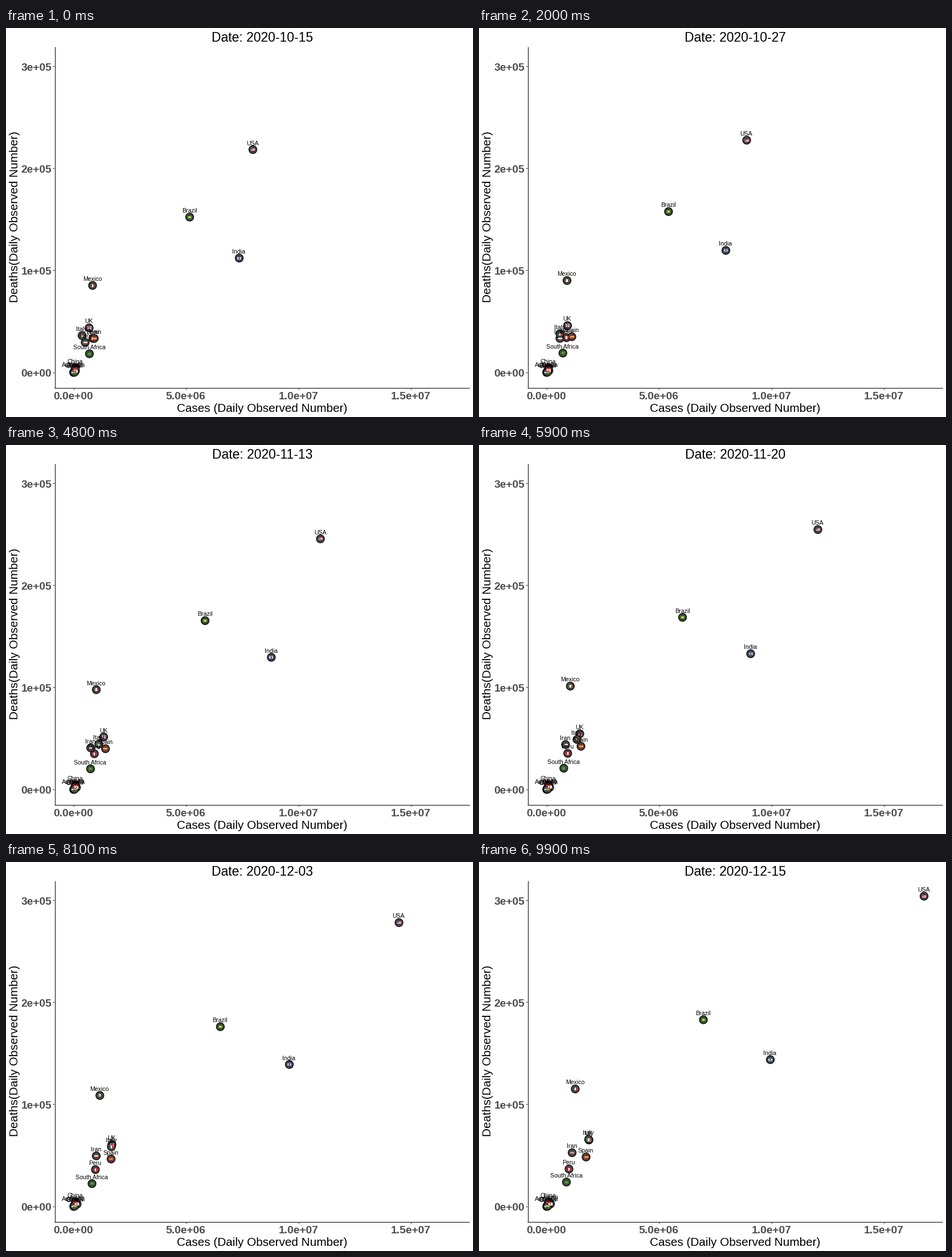
A matplotlib script for the animation above (10 s loop, 820x683 px).

```python
import matplotlib.pyplot as plt
import numpy as np
from matplotlib.animation import FuncAnimation
from matplotlib.patches import Circle, Polygon, Rectangle
from matplotlib.transforms import Affine2D

W, H, DPI = 820, 683, 64
FRAMES, DAYS = 100, 61
START = np.datetime64("2020-10-15")
GREY = "#4d4d4d"
RED, GREEN, BLUE, YELLOW = "#d8343f", "#2f8f45", "#33508f", "#f2cf2e"

plt.rcParams["font.family"] = "Liberation Sans"
fig = plt.figure(figsize=(W / DPI, H / DPI), dpi=DPI, facecolor="white")
ax = fig.add_axes([0, 0, 1, 1])
ax.set(xlim=(0, W), ylim=(H, 0))
ax.axis("off")

# Key times by number of waypoints
KEYS = {2: [0, 99], 4: [0, 38, 68, 99], 7: [0, 20, 38, 59, 68, 81, 99]}

# name: (x waypoints, y waypoints, disc tint, band direction, bands, emblem)
COUNTRIES = {
    "Australia": ([119.4, 119.5], [603.4, 603.4],
                  "#3c4050", "h", [BLUE], None),
    "Cuba": ([118.7, 118.9], [604.8, 604.8],
             "#3c4050", "h", [BLUE, "white", BLUE], None),
    "Japan": ([122, 125.5], [602, 600.3],
              "#4a4a4a", "h", ["white"], ("dot", RED)),
    "China": ([121.8, 121.9], [596.8, 596.8],
              "#5a3c3c", "h", [RED], None),
    "Ghana": ([120.2, 120.5], [604.4, 604.3],
              "#454a3c", "h", [RED, YELLOW, GREEN], None),
    "South Africa": ([146.5, 148, 149.5, 153.5], [572, 569.5, 566.5, 562],
                     "#344d2c", "h", ["#3f7f3a"], ("dot", "#86a83c")),
    "Peru": ([152.5, 158], [545, 539],
             "#583c3e", "v", [RED, "white", RED], None),
    "Iran": ([139, 142, 146, 152, 155, 158.5, 163.5],
             [552, 545, 537, 526, 522, 516, 510.5],
             "#454745", "h", [GREEN, "white", RED], None),
    "Spain": ([155, 163, 170.5, 179, 182, 184.5, 188],
              [545, 542, 537, 529, 526, 521.5, 518],
              "#583f38", "h", [RED, YELLOW, RED], ("dot", "#f0a030")),
    "UK": ([146, 155.5, 166, 177, 180.5, 186, 193],
           [526.5, 522.5, 517, 507, 502.5, 496, 488],
           "#474350", "h", ["#c9cde0"], ("cross", RED)),
    "Italy": ([133.5, 142, 154.5, 172, 178, 185, 192.5],
              [540, 537, 531, 517, 510, 500, 487],
              "#454745", "v", [GREEN, "white", RED], None),
    "Mexico": ([152, 157, 162, 169], [452, 435, 418, 398.5],
               "#48453f", "v", [GREEN, "white", RED], None),
    "India": ([409.5, 433.5, 455, 477, 485.5, 497.5, 511.5],
              [404, 390.5, 379, 366.5, 362, 355.5, 347],
              "#3f4350", "h", ["#8f97b0", "white", "#8f97b0"],
              ("dot", BLUE)),
    "Brazil": ([322.5, 343, 364.5, 394], [332, 313.5, 297.5, 277],
               "#364a30", "h", ["#4b8f3c"], ("diamond", "#d4d84a")),
    "USA": ([433.5, 470, 517.5, 595, 632, 690, 781.5],
            [213.5, 197, 177.5, 148.5, 132.5, 106.5, 60],
            "#474350", "h", [RED, "white", RED, "white", RED],
            ("canton", "#5a74a8")),
}


def track(points):
    """Smooth path through the waypoints, one value per frame."""
    t, p = np.array(KEYS[len(points)], float), np.array(points, float)
    m = np.gradient(p, t)
    n = np.arange(FRAMES)
    i = np.clip(np.searchsorted(t, n, side="right") - 1, 0, len(t) - 2)
    h = t[i + 1] - t[i]
    u = (n - t[i]) / h
    return ((2 * u**3 - 3 * u**2 + 1) * p[i] + (u**3 - 2 * u**2 + u) * h * m[i]
            + (3 * u**2 - 2 * u**3) * p[i + 1] + (u**3 - u**2) * h * m[i + 1])


def write(x, y, s, px, **kw):
    kw = {"ha": "center", "va": "baseline", "color": "black", **kw}
    return ax.text(x, y, s, fontsize=px * 72 / DPI, **kw)


def line(xs, ys, color="black"):
    ax.plot(xs, ys, color=color, lw=72 / DPI, solid_capstyle="butt")


def flag_parts(direction, bands, emblem, w=7, h=5):
    n = len(bands)
    for k, color in enumerate(bands):
        if direction == "v":
            yield Rectangle((-w / 2 + k * w / n, -h / 2), w / n, h, fc=color)
        else:
            yield Rectangle((-w / 2, -h / 2 + k * h / n), w, h / n, fc=color)
    if emblem:
        kind, color = emblem
        if kind == "dot":
            yield Circle((0, 0), 1.3, fc=color)
        elif kind == "diamond":
            yield Polygon([(-3, 0), (0, -2), (3, 0), (0, 2)], fc=color)
        elif kind == "canton":
            yield Rectangle((-w / 2, -h / 2), 3, 2.6, fc=color)
        elif kind == "cross":
            yield Rectangle((-w / 2, -0.8), w, 1.6, fc=color)
            yield Rectangle((-0.8, -h / 2), 1.6, h, fc=color)


class Marker:
    def __init__(self, name, xs, ys, tint, *flag):
        self.x, self.y = track(xs), track(ys)
        self.shift = Affine2D()
        self.add(Circle((0, 0), 7, fc=tint, ec="black", lw=1.2 * 72 / DPI), 3)
        for part in flag_parts(*flag):
            part.set_linewidth(0)
            self.add(part, 4)
        self.label = write(0, 0, name, 10.5, zorder=5)

    def add(self, patch, z):
        # Patches apply their own shape transform before this one
        patch.set_zorder(z)
        patch.set_transform(self.shift + ax.transData)
        ax.add_patch(patch)

    def move(self, n):
        x, y = self.x[n], self.y[n]
        self.shift.clear().translate(x, y)
        self.label.set_position((x - 0.5, y - 8))


# Axes, ticks and titles
line([85.5, 85.5], [33, 632])
line([85, 814], [631.5, 631.5])
for k in range(4):
    y = 604.5 - 179.1 * k
    line([82, 85], [y, y], "#333333")
    write(80.3, y + 7.5, f"{k}e+05" if k else "0e+00", 19.1,
          ha="right", color=GREY, weight="bold")
for k, s in enumerate(["0.0e+00", "5.0e+06", "1.0e+07", "1.5e+07"]):
    x = 118.5 + 197.6 * k
    line([x, x], [632, 635], "#333333")
    write(x - 0.5, 651.5, s, 19.3, color=GREY, weight="bold")
write(450, 674.5, "Cases (Daily Observed Number)", 20.7)
write(21.5, 332, "Deaths(Daily Observed Number)", 20.7,
      rotation=90, rotation_mode="anchor")
title = write(449.7, 23.5, "", 22.9)
markers = [Marker(name, *spec) for name, spec in COUNTRIES.items()]


def update(n):
    day = START + np.timedelta64(n * DAYS // (FRAMES - 1), "D")
    title.set_text(f"Date: {day}")
    for m in markers:
        m.move(n)
    return [title]


anim = FuncAnimation(fig, update, frames=FRAMES, interval=100,
                     repeat=True, repeat_delay=0, blit=False)
plt.show()
```
